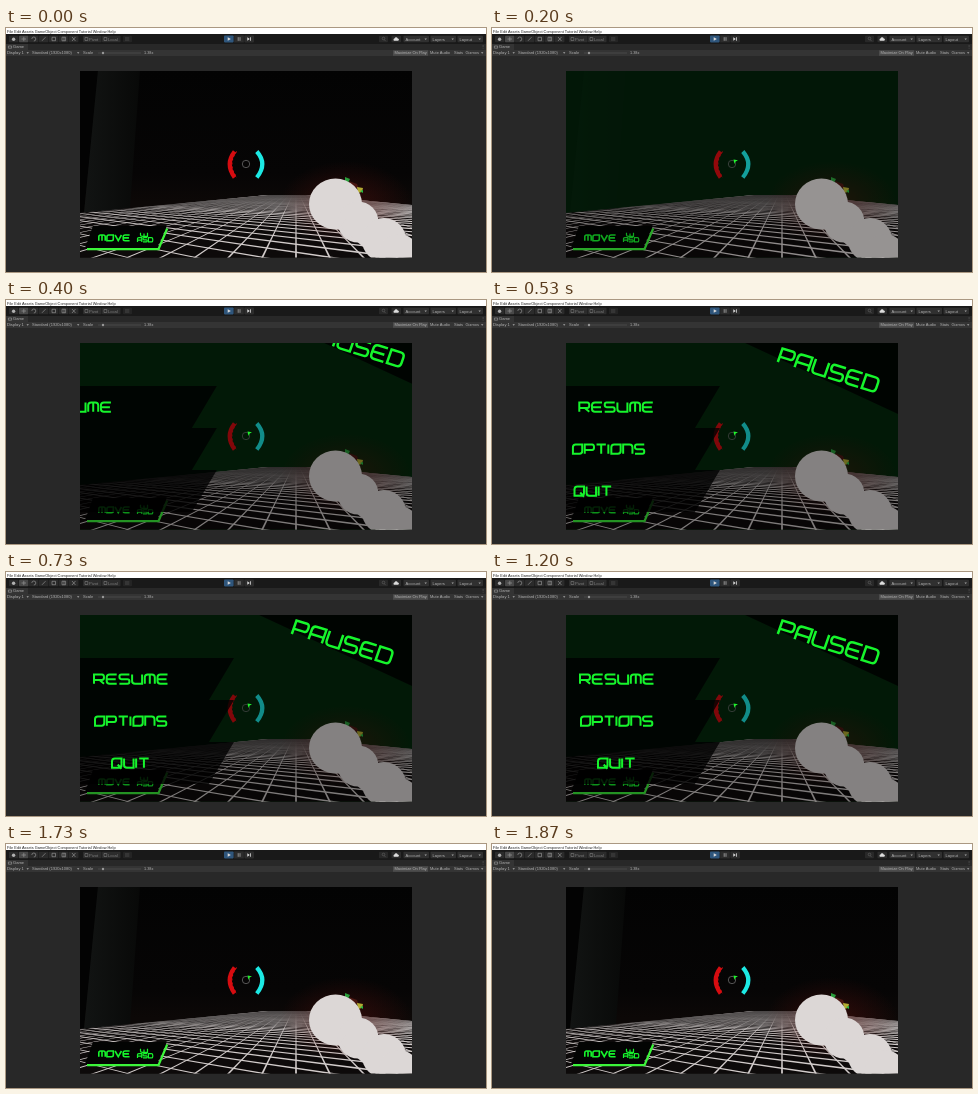
An HTML page for the animation above (2.27 s loop, 480 by 244 pixels).

```html
<!DOCTYPE html>
<html lang="en">
<head>
<meta charset="utf-8">
<title>Pause menu</title>
<style>
html, body { margin: 0; width: 100%; height: 100%; overflow: hidden; background: #282828; }
svg { display: block; width: 100vw; height: 100vh; }
text { font-family: "Liberation Sans", Arial, sans-serif; font-size: 4.1px; fill: #b4b4b4; }
.glyphs path { fill: none; stroke: #16f52c; vector-effect: non-scaling-stroke; }
</style>
</head>
<body>
<svg id="stage" viewBox="0 0 480 244" preserveAspectRatio="none">
  <defs>
    <clipPath id="view"><rect x="74" y="43" width="332" height="186.5"/></clipPath>
    <clipPath id="floorArea"><path d="M74 185L262 167H300L407 177V230H74Z"/></clipPath>
    <linearGradient id="wall" x2="0" y2="1">
      <stop stop-color="#030303"/><stop offset=".55" stop-color="#060505"/><stop offset=".7" stop-color="#0c0807"/>
    </linearGradient>
    <linearGradient id="sideWall">
      <stop stop-color="#121413"/><stop offset="1" stop-color="#080908"/>
    </linearGradient>
    <linearGradient id="haze" x2="0" y2="1">
      <stop stop-color="#080606" stop-opacity=".75"/><stop offset=".3" stop-color="#080606" stop-opacity="0"/>
    </linearGradient>
    <radialGradient id="glow">
      <stop stop-color="#7a1410" stop-opacity=".35"/><stop offset="1" stop-color="#7a1410" stop-opacity="0"/>
    </radialGradient>
  </defs>
  <rect width="480" height="244" fill="#282828"/>
  <g id="chrome"></g>
  <g clip-path="url(#view)">
    <rect x="74" y="42" width="333" height="188" fill="url(#wall)"/>
    <path d="M74 42H92L78 185H74Z" fill="#030303"/>
    <path d="M92 42H134L124 180L78 185Z" fill="url(#sideWall)"/>
    <rect id="tint" x="74" y="42" width="333" height="188" fill="#03290c"/>
    <g clip-path="url(#floorArea)">
      <rect x="74" y="160" width="333" height="70" fill="#0d0a0a"/>
      <g id="grid" fill="#d2cccb"></g>
      <rect x="74" y="165" width="333" height="65" fill="url(#haze)"/>
    </g>
    <ellipse cx="340" cy="175" rx="66" ry="42" fill="url(#glow)"/>
    <g>
      <path d="M339 149l5 2-2 4-3-2z" fill="#2a9d3b"/>
      <path d="M343 153l8 3 2 5-6-2z" fill="#4a1712"/>
      <path d="M351 159l6 1-1 4-4 1z" fill="#b4ac32"/>
      <path d="M354 163l3-1v3z" fill="#25b845"/>
    </g>
    <g fill="#dcd7d6">
      <ellipse cx="329.5" cy="176" rx="26.5" ry="25.5"/>
      <circle cx="352" cy="194" r="20.5"/>
      <circle cx="378" cy="212" r="22"/>
      <circle cx="393" cy="226" r="20"/>
      <path d="M340 190L380 230H370L334 199Z"/>
    </g>
    <g fill="none" stroke-width="4.2">
      <path d="M228.6 123.5Q218.8 136 228.6 149.5" stroke="#d60c10"/>
      <path d="M250.8 123.5Q261.8 136 250.8 149.5" stroke="#1ce9e4"/>
      <path d="M230.6 123.5Q221 136 230.6 149.5" stroke="#d60c10" stroke-width="1.2" stroke-dasharray="2 2"/>
      <circle cx="240" cy="136" r="3.7" stroke="#777" stroke-width=".7"/>
    </g>
    <path d="M87 198H161L151 220H79Z" fill="#030403"/>
    <path d="M161.2 200.5L152.5 221.2H81" fill="none" stroke="#3cf53a" stroke-width="2.2"/>
    <g id="hint" class="glyphs"></g>
    <rect id="shade" x="74" y="42" width="333" height="188"/>
    <g id="panels" fill="#000" fill-opacity=".78">
      <path d="M60 86H228L203 128H228L203 170H228L203 212H60Z"/>
    </g>
    <g id="banner">
      <path d="M180 10L252 42.5L407 114.5V10Z" fill="#000" fill-opacity=".82"/>
    </g>
    <g id="menu" class="glyphs"></g>
    <path id="cursor" d="M241.5 131.5L246 132.2L243.6 133.4L242.6 136Z" fill="#20f52c"/>
  </g>
</svg>
<script>
const LOOP = 2270, STEP = 1000 / 15, RESUMED = 1725;
const $ = id => document.getElementById(id);

function add(parent, tag, attrs, content) {
  const node = document.createElementNS("http://www.w3.org/2000/svg", tag);
  for (const key in attrs) node.setAttribute(key, attrs[key]);
  if (content) node.textContent = content;
  parent.append(node);
  return node;
}

// Letter strokes on a 10 by 10 cell
const LETTERS = {
  A: "M0 10V3Q0 0 3 0H10V10M0 6H10",
  D: "M0 0H7Q10 0 10 3V7Q10 10 7 10H0Z",
  E: "M10 0H3Q0 0 0 3V7Q0 10 3 10H10M0 5H9",
  I: "M0 0V10",
  M: "M0 10V3Q0 0 3 0H7Q10 0 10 3V10M5 0V10",
  N: "M0 10V0H7Q10 0 10 3V10",
  O: "M3 0H10V7Q10 10 7 10H0V3Q0 0 3 0Z",
  P: "M0 10V0H8Q10 0 10 3T8 6H0",
  Q: "M3 0H10V7Q10 10 7 10H0V3Q0 0 3 0ZM6 6.5L10 11",
  R: "M0 10V0H8Q10 0 10 3T8 6H0M5.5 6L10 10",
  S: "M10 0H2Q0 0 0 2.5T2 5H8Q10 5 10 7.5T8 10H0",
  T: "M0 0H10M5 0V10",
  U: "M0 0V7Q0 10 3 10H10V0",
  V: "M0 0L5 10L10 0",
  W: "M0 0V7Q0 10 3 10H10V0M5 2V10"
};

function lettering(parent, word, transform, weight) {
  const group = add(parent, "g", { class: "glyphs", role: "img", "aria-label": word });
  const inner = add(group, "g", { transform });
  let x = 0;
  for (const letter of word) {
    add(inner, "path", { d: LETTERS[letter], transform: `translate(${x})`, "stroke-width": weight });
    x += letter === "I" ? 3.2 : 12.7;
  }
  return group;
}

function buildChrome() {
  const root = $("chrome");
  const box = (x, y, width, height, fill, rx = 0) => add(root, "rect", { x, y, width, height, fill, rx });
  const label = (x, y, words, extra) => add(root, "text", { x, y, ...extra }, words);
  const line = (d, stroke = "#a0a0a0") => add(root, "path", { d, stroke, fill: "none", "stroke-width": .6 });
  const arrow = (x, y) => add(root, "path", { d: `M${x} ${y}h2.4l-1.2 1.5z`, fill: "#a8a8a8" });

  box(0, 0, 480, 6, "#fff");
  label(1, 4.6, "File Edit Assets GameObject Component Tutorial Window Help", { style: "fill:#222;font-size:3.9px" });
  box(0, 6, 480, 10, "#191919");
  for (let i = 0; i < 7; i++) box(3 + i * 10, 7.7, 9.4, 6.5, i === 1 ? "#484848" : "#2b2b2b", .8);
  add(root, "circle", { cx: 7.6, cy: 11.2, r: 1.7, fill: "#b0b0b0" });
  line("M15.5 11H20M17.8 8.8V13.2M25.8 11a2 2 0 1 1 2 2M36 12.8L39.5 9.2M46 9.3h3.5v3.4H46ZM56 9.2h3.6v3.6H56ZM58 9v4M66 13l3.5-4M66 9l3.5 4");
  box(77, 7.7, 18.5, 6.5, "#2c2c2c", .8);
  box(96, 7.7, 18.5, 6.5, "#2c2c2c", .8);
  box(117, 7.7, 9, 6.5, "#242424", .8);
  line("M79 9.5h2.8v3H79ZM98 9.5h2.8v3H98Z", "#808080");
  label(83, 12.5, "Pivot", { style: "fill:#808080" });
  label(102, 12.5, "Local", { style: "fill:#808080" });
  line("M120 9v4M122 9v4M119 10h4.5M119 12h4.5", "#484848");

  box(218, 7.4, 9.6, 7, "#2f567c", .8);
  box(228.2, 7.4, 9.6, 7, "#2c2c2c");
  box(238.4, 7.4, 9.6, 7, "#2c2c2c", .8);
  add(root, "path", { d: "M221.7 9.2l3.2 1.8-3.2 1.8zM241.3 9.3l2.5 1.7-2.5 1.7zM244 9.3h.8v3.4H244z", fill: "#d8d8d8" });
  line("M232.2 9.2v3.6M234 9.2v3.6", "#d8d8d8");

  box(373, 7.7, 9, 6.5, "#282828", .8);
  box(385.5, 7.7, 9.5, 6.5, "#2c2c2c", .8);
  line("M378.3 11.7l1.4 1.5M376.2 10.5a1.3 1.3 0 1 0 2.6 0a1.3 1.3 0 1 0-2.6 0", "#666");
  add(root, "path", { d: "M388 12.7a1.3 1.3 0 0 1 .5-2.3a1.7 1.7 0 0 1 3.2 0a1.2 1.2 0 0 1 .5 2.3z", fill: "#ddd" });
  [["Account", 397.5], ["Layers", 424.5], ["Layout", 451.5]].forEach(([name, x]) => {
    box(x, 7.7, 25.5, 6.5, "#303030", .8);
    label(x + 2, 12.5, name);
    arrow(x + 21, 10.4);
  });

  box(0, 16, 22, 6, "#343434");
  line("M2.4 18h3.2v2.2H2.4Z");
  label(7, 20.4, "Game");
  label(475, 20.4, "⋮");
  box(0, 22, 480, 6, "#343434");
  label(1, 26.4, "Display 1");
  arrow(20.5, 24.3);
  label(26, 26.4, "Standard (1920x1080)", { style: "font-size:4px" });
  arrow(71, 24.3);
  label(77, 26.4, "Scale");
  line("M92 25H135", "#555");
  add(root, "circle", { cx: 97, cy: 25, r: 1.2, fill: "#999" });
  label(138, 26.4, "1.38x", { style: "font-size:3.8px" });
  box(387, 22.3, 35, 5.5, "#4c4c4c");
  label(388.5, 26.4, "Maximize On Play", { style: "font-size:4px" });
  label(424, 26.4, "Mute Audio", { style: "font-size:4px" });
  label(448, 26.4, "Stats", { style: "font-size:4px" });
  label(459.5, 26.4, "Gizmos", { style: "font-size:4px" });
  arrow(475, 24.3);
}

// Floor tiles in two-point perspective; every line tapers toward its vanishing point
function buildGrid() {
  const horizon = 160, ahead = 290, aside = -150, near = 230;
  const taper = (x0, x1, y1, dx, dy) => add($("grid"), "path", {
    d: `M${x0} ${horizon}L${x1 - dx} ${y1 - dy}L${x1 + dx} ${y1 + dy}Z`
  });
  for (let depth = 3; depth < 64; depth++) {
    const drop = 450 / depth * (407 - aside) / (ahead - aside);
    taper(aside, 407, horizon + drop, 0, Math.min(.9, drop * .011 + .1));
  }
  for (let i = -60; i <= 30; i++) taper(ahead, ahead + i * 34, near, .9 + Math.abs(i) * .1, 0);
}

buildChrome();
buildGrid();
lettering($("hint"), "MOVE", "translate(92.8 207) scale(.64 .57)", 1.6);
lettering($("hint"), "W", "translate(134.5 204.8) scale(.7 .35)", 1.2);
lettering($("hint"), "ASD", "translate(131.5 209.7) scale(.43 .42)", 1.2);
lettering($("banner"), "PAUSED", "matrix(1.32 .41 -.33 .95 290.5 48.5) scale(1 1.42)", 2.5);
const items = [
  [lettering($("menu"), "RESUME", "translate(88 102.5) scale(1 .93)", 2), 290],
  [lettering($("menu"), "OPTIONS", "translate(89 144.5) scale(.93 .93)", 2), 330],
  [lettering($("menu"), "QUIT", "translate(106 186.5) scale(.95 .93)", 2), 370]
];

const clamp = v => Math.max(0, Math.min(1, v));
const remaining = (t, start, length) => (1 - clamp((t - start) / length)) ** 2;

function draw(time) {
  const t = Math.floor((time + 5) / STEP) * STEP;
  const paused = time >= 65 && time < RESUMED;
  const dim = paused ? clamp((t - 10) / 240) : 0;
  $("tint").setAttribute("opacity", dim);
  $("shade").setAttribute("opacity", dim * .4);
  for (const id of ["panels", "banner", "menu"]) $(id).style.display = paused ? "" : "none";
  $("cursor").style.display = time >= 65 ? "" : "none";
  $("panels").setAttribute("transform", `translate(${-154 * remaining(t, 200, 300)})`);
  const away = remaining(t, 270, 260);
  $("banner").setAttribute("transform", `translate(${45 * away} ${-100 * away})`);
  for (const [node, start] of items) {
    node.setAttribute("transform", `translate(${-170 * remaining(t, start, 260)})`);
  }
}

const began = performance.now();
function tick() {
  draw((performance.now() - began) % LOOP);
  requestAnimationFrame(tick);
}
draw(0);
tick();
</script>
</body>
</html>
```
